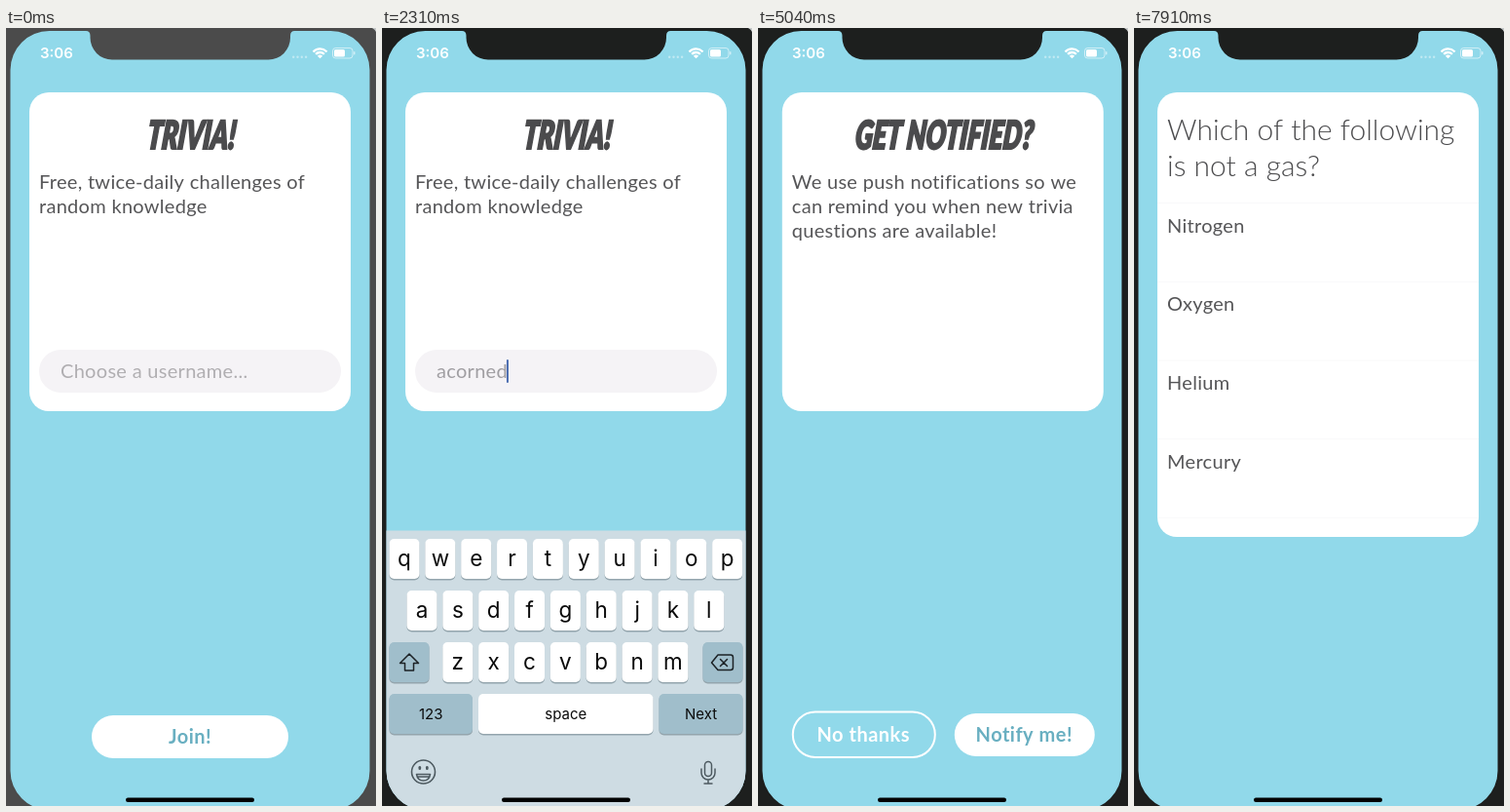
Write an HTML page with a canvas that moves like this. It is 380 px wide and 798 px high and loops after 8000 ms.

```html
<!DOCTYPE html>
<html lang="en">
<head>
<meta charset="utf-8">
<title>Trivia onboarding</title>
<style>
  html, body { margin: 0; width: 100%; height: 100%; overflow: hidden; background: #1d1f1e; }
  canvas { display: block; width: 380px; height: 798px; }
</style>
</head>
<body>
<canvas></canvas>
<script>
const W = 380, H = 798, LOOP = 8000, STEP = 70;
const BLUE = '#91d9ea', INK = '#4b4b4d', SOFT_INK = '#565658', TEAL = '#69afc1', KEY_TEXT = '#0b0b0b';
const ROUND = 'Lato, sans-serif', SYSTEM = 'Inter, sans-serif';
const USERNAME = 'acorned';

const canvas = document.querySelector('canvas');
const ctx = canvas.getContext('2d');
const dpr = window.devicePixelRatio || 1;
canvas.width = W * dpr;
canvas.height = H * dpr;

const clamp = (v, lo = 0, hi = 1) => Math.min(hi, Math.max(lo, v));

// Critically damped spring: 0 before start, settling at 1.
function spring(t, start, rate) {
  const x = Math.max(0, t - start) / 1000 * rate;
  return 1 - (1 + x) * Math.exp(-x);
}

function box(x, y, w, h, r, fill) {
  ctx.beginPath();
  ctx.roundRect(x, y, w, h, r);
  ctx.fillStyle = fill;
  ctx.fill();
}

function stroke(path, color, width) {
  ctx.strokeStyle = color;
  ctx.lineWidth = width;
  ctx.lineCap = ctx.lineJoin = 'round';
  ctx.stroke(new Path2D(path));
}

function text(str, x, y, { size = 20, weight = 400, color = INK, family = ROUND, align = 'left', spacing = 0 } = {}) {
  ctx.font = `${weight} ${size}px ${family}`;
  ctx.letterSpacing = `${spacing}px`;
  ctx.textAlign = align;
  ctx.fillStyle = color;
  ctx.fillText(str, x, y);
  return ctx.measureText(str).width;
}

const body = (str, x, y, color = SOFT_INK) => text(str, x, y, { color, spacing: 0.3 });

const label = (str, x, y, color) =>
  text(str, x, y, { weight: 700, color, align: 'center', spacing: 0.5 });

// Condensed, slanted comic lettering, thickened with an outline.
function heading(str) {
  ctx.save();
  ctx.translate(189.5, 124);
  ctx.transform(0.67, 0, -0.1, 1, 0, 0);
  text(str, 0, 0, { size: 40, weight: 'italic 900', align: 'center' });
  ctx.strokeStyle = INK;
  ctx.lineWidth = 2.2;
  ctx.lineJoin = 'miter';
  ctx.miterLimit = 3;
  ctx.strokeText(str, 0, 0);
  ctx.restore();
}

const card = height => box(24, 66, 330, height, 20, '#fff');

function withAlpha(alpha, draw) {
  ctx.save();
  ctx.globalAlpha *= alpha;
  draw();
  ctx.restore();
}

// Opacity of a button tapped at the given moment.
function tapAlpha(t, at) {
  const p = clamp((t - at) / 280);
  return 1 - 0.5 * Math.sin(Math.PI * p);
}

function joinPage(t) {
  card(327);
  heading('TRIVIA!');
  body('Free, twice-daily challenges of', 34, 165);
  body('random knowledge', 34, 190);

  box(34, 330, 310, 44, 22, '#f5f3f6');
  const typed = USERNAME.slice(0, clamp(Math.floor((t - 1400) / 120) + 1, 0, USERNAME.length));
  const width = body(typed || 'Choose a username...', 56, 359, typed ? '#a09ea2' : '#b0aeb1');
  if (t >= 630 && t < 2660) box(56 + (typed ? width - 1 : 0), 340, 2, 24, 1, '#4a6cb0');

  withAlpha(tapAlpha(t, 3220), () => {
    box(88, 705, 202, 44, 22, '#fff');
    label('Join!', 189, 734, TEAL);
  });
}

function notifyPage(t) {
  card(327);
  heading('GET NOTIFIED?');
  body('We use push notifications so we', 34, 165);
  body('can remind you when new trivia', 34, 190);
  body('questions are available!', 34, 214.5);

  ctx.beginPath();
  ctx.roundRect(35, 701.5, 146, 46.5, 23);
  ctx.strokeStyle = '#fff';
  ctx.lineWidth = 2;
  ctx.stroke();
  label('No thanks', 107.5, 732, '#fff');

  withAlpha(tapAlpha(t, 5740), () => {
    box(201, 703, 144, 44, 22, '#fff');
    label('Notify me!', 272.5, 732, TEAL);
  });
}

function questionPage() {
  card(456);
  text('Which of the following', 34, 115, { size: 30, weight: 300 });
  text('is not a gas?', 34, 152, { size: 30, weight: 300 });
  ['Nitrogen', 'Oxygen', 'Helium', 'Mercury'].forEach((answer, i) =>
    body(answer, 34, 209.5 + i * 80.7));
  for (let i = 0; i < 5; i++) box(24, 179 + i * 80.7, 330, 1, 0, '#f9f9fa');
}

function key(x, y, w, fill = '#fff') {
  box(x, y + 1, w, 41.5, 5, '#94a5ad');
  box(x, y, w, 41, 5, fill);
}

function keyLabel(str, x, y, size) {
  text(str, x, y, { size, family: SYSTEM, color: KEY_TEXT, align: 'center' });
}

function keyboard(offset) {
  const special = '#a0becb', icon = '#4d5a60', pitch = 36.85;
  ctx.save();
  ctx.translate(0, offset);
  box(0, 515.5, W, 300, 0, '#cedce3');

  [['qwertyuiop', 7.5], ['asdfghjkl', 25.5], ['zxcvbnm', 62.3]].forEach(([letters, left], row) => {
    const y = 524 + row * 53;
    [...letters].forEach((letter, i) => {
      const x = left + i * pitch;
      key(x, y, 31);
      keyLabel(letter, x + 15.5, y + 27.5, 22.5);
    });
  });

  key(7.5, 630, 41, special);
  key(329.5, 630, 41, special);
  [['123', 7.5, 85.5, special], ['space', 99, 179.5, '#fff'], ['Next', 284.5, 86, special]].forEach(([name, x, w, fill]) => {
    key(x, 683, w, fill);
    keyLabel(name, x + w / 2, 709, 15);
  });

  stroke('M28 642 L37.5 651.5 H32.5 V659 H23.5 V651.5 H18.5 Z', '#1c2226', 1.5);
  stroke('M345 643 H358 Q360.5 643 360.5 645.5 V656 Q360.5 658.5 358 658.5 H345 L338.5 651 Z M347.5 647.5 L354.5 654.5 M354.5 647.5 L347.5 654.5', '#1c2226', 1.5);

  stroke('M30.5 763 a12 12 0 1 0 24 0 a12 12 0 1 0 -24 0 M35.5 765.5 H49.5 Q48.5 772 42.5 772 Q36.5 772 35.5 765.5 M37 768 H48', icon, 1.6);
  box(37.5, 757, 2.6, 4, 1.3, icon);
  box(45, 757, 2.6, 4, 1.3, icon);

  stroke('M331.5 756 a3.5 3.5 0 0 1 7 0 V764 a3.5 3.5 0 0 1 -7 0 Z M328 760 V764 a7 7 0 0 0 14 0 V760 M335 771 V775 M331 775 H339', icon, 1.5);
  ctx.restore();
}

const screen = new Path2D(
  'M4.5 43 A40 40 0 0 1 44.5 3 H82 Q86.5 3 86.5 8 V10 A22.5 22.5 0 0 0 109 32.5' +
  'H269.5 A22.5 22.5 0 0 0 292 10 V8 Q292 3 296.5 3 H333.5 A40 40 0 0 1 373.5 43' +
  'V762 A40 40 0 0 1 333.5 802 H44.5 A40 40 0 0 1 4.5 762 Z');

function statusBar() {
  text('3:06', 35, 31, { size: 15, weight: 600, family: SYSTEM, color: '#fff' });
  for (let i = 0; i < 4; i++) box(294 + i * 4.3, 28.5, 2.4, 2.4, 1.2, '#ffffff70');

  ctx.strokeStyle = '#fff';
  ctx.lineWidth = 2.3;
  ctx.lineCap = 'butt';
  for (const r of [9.6, 6]) {
    ctx.beginPath();
    ctx.arc(322.5, 31, r, -Math.PI * 0.76, -Math.PI * 0.24);
    ctx.stroke();
  }
  ctx.beginPath();
  ctx.moveTo(322.5, 31.2);
  ctx.arc(322.5, 31.2, 3.6, -Math.PI * 0.76, -Math.PI * 0.24);
  ctx.fillStyle = '#fff';
  ctx.fill();

  ctx.beginPath();
  ctx.roundRect(335.5, 20.5, 20.5, 10.5, 3);
  ctx.strokeStyle = '#ffffff90';
  ctx.lineWidth = 1;
  ctx.stroke();
  box(337, 22, 11, 7.5, 1.6, '#fff');
  box(357, 24, 1.5, 3.5, 0.7, '#ffffff90');
}

const pages = [
  { draw: joinPage, leave: 3510 },
  { draw: notifyPage, enter: 4419, leave: 6100 },
  { draw: questionPage, enter: 7009 },
];

function pageOffset({ enter, leave }, t) {
  const travel = 372, rate = 13.5;
  const arriving = enter === undefined ? 0 : travel * (1 - spring(t, enter, rate));
  const leaving = leave === undefined ? 0 : (travel + 8) * spring(t, leave, rate);
  return arriving - leaving;
}

function render(t) {
  ctx.setTransform(dpr, 0, 0, dpr, 0, 0);
  box(0, 0, W, H, 0, t < 560 ? '#4b4b4b' : '#1d1f1e');
  ctx.fillStyle = '#c4c8c8';
  ctx.fill(new Path2D('M376 0 H380 V4 Q379 1.5 376 0 Z'));

  ctx.save();
  ctx.clip(screen);
  box(0, 0, W, H, 0, BLUE);
  for (const page of pages) {
    const x = pageOffset(page, t);
    if (Math.abs(x) > 371) continue;
    ctx.save();
    ctx.translate(x, 0);
    page.draw(t);
    ctx.restore();
  }
  const raised = spring(t, 600, 11.6) - spring(t, 2630, 11.6);
  if (raised > 0.001) keyboard(283 * (1 - raised));
  ctx.restore();

  statusBar();
  box(123, 789.5, 132, 4.5, 2.2, '#000');
}

function tick() {
  const t = performance.now() % LOOP;
  render(Math.floor(t / STEP) * STEP);
  requestAnimationFrame(tick);
}
tick();
</script>
</body>
</html>
```
